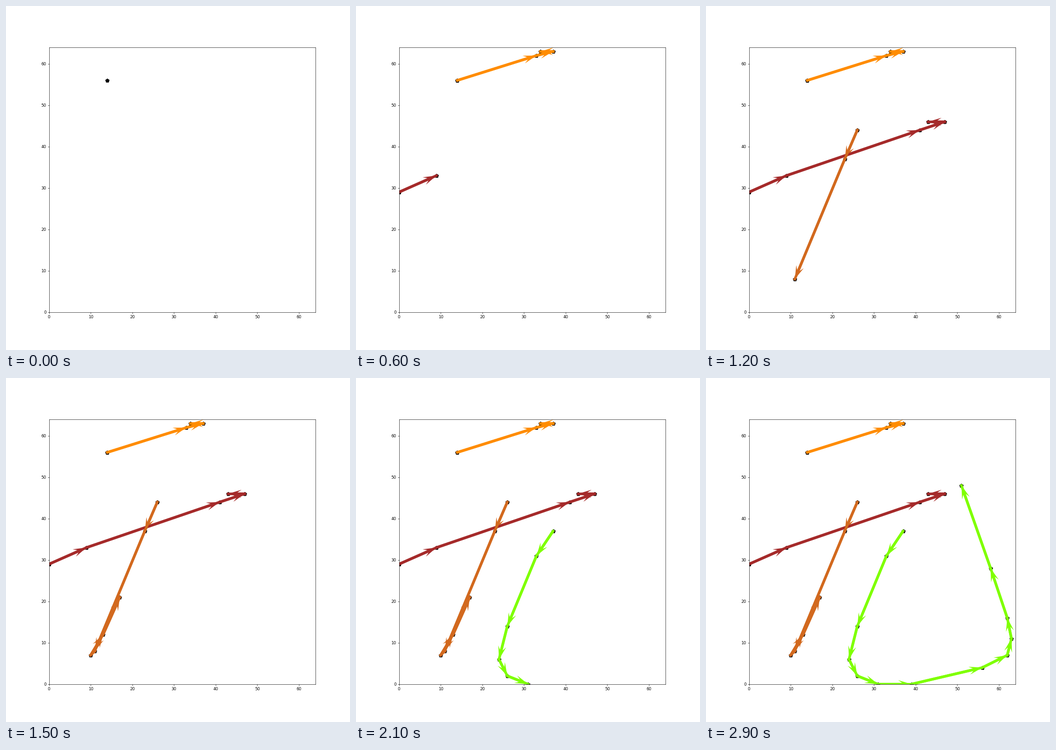
Animation of 748 by 748 pixels, one loop 3 s. Source, as a matplotlib script:

```python
import matplotlib.pyplot as plt
from matplotlib.animation import FuncAnimation

SIZE, INCHES = 748, 12
FRAMES, INTERVAL = 30, 100


def along_x(xs, slope, offset, recoil):
    """Points on a rising line, ending with a level step back."""
    points = [(x, round(offset + slope * x)) for x in xs]
    x, y = points[-1]
    return points + [(x - recoil, y)]


def along_y(ys, slope, offset):
    """Points on a steep line, given by their heights."""
    return [(round(offset + slope * y), y) for y in ys]


LOOP = [(37, 37), (33, 31), (26, 14), (24, 6), (26, 2), (31, 0), (39, 0),
        (56, 4), (62, 7), (63, 11), (62, 16), (58, 28), (51, 48)]

# One point is reached per frame; the first one is held for two.
STROKES = [
    ("darkorange", along_x([14, 14, 33, 37], 0.3, 52, recoil=3)),
    ("brown", along_x([0, 9, 41, 47], 0.36, 29.3, recoil=4)),
    ("chocolate", along_y([44, 37, 8, 7, 12, 21], 0.43, 7.48)),
    ("chartreuse", LOOP),
]

fig, ax = plt.subplots(figsize=(INCHES, INCHES), dpi=SIZE / INCHES)


def add_step(start, end, color):
    """Put a marker at end and, within a stroke, an arrow leading to it."""
    artists = [ax.scatter(*end, s=100, c="black", marker="p")]
    if start is not None:
        (x0, y0), (x1, y1) = start, end
        artists.append(ax.quiver(x0, y0, x1 - x0, y1 - y0, color=color,
                                 width=0.01, headaxislength=3.5,
                                 angles="xy", scale_units="xy", scale=1))
        artists += ax.plot([x0, x1], [y0, y1], color=color, lw=6.5,
                           solid_capstyle="projecting")
    return artists


steps = [add_step(start, end, color)
         for color, points in STROKES
         for start, end in zip([None] + points, points)]

ax.set_xlim(0, 64)
ax.set_ylim(0, 64)


def update(frame):
    for i, artists in enumerate(steps):
        for artist in artists:
            artist.set_visible(i <= frame)
    return [artist for artists in steps for artist in artists]


anim = FuncAnimation(fig, update, frames=FRAMES, interval=INTERVAL,
                     repeat=True, repeat_delay=0, blit=False)
plt.show()
```
